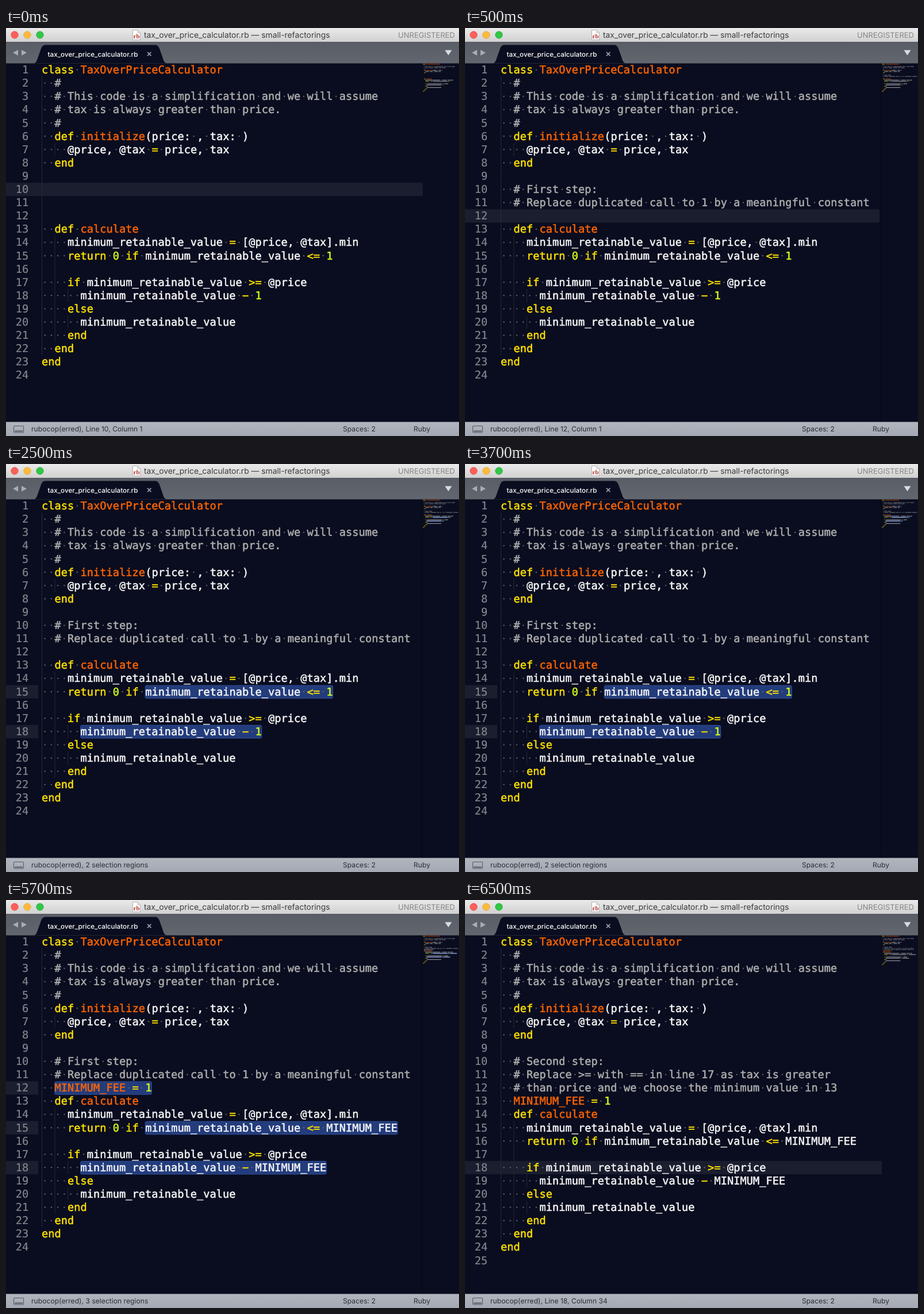
An HTML page for the animation above (8000 ms loop, 788 by 710 pixels).

```html
<!DOCTYPE html>
<html lang="en">
<head>
<meta charset="utf-8">
<title>Refactoring in an editor</title>
<style>
  html, body { margin: 0; width: 100%; height: 100%; overflow: hidden; background: #0a0d1f; }
  svg { display: block; width: 788px; height: 710px; }
  text { white-space: pre; text-rendering: geometricPrecision; }
  .code { font: 18.7px "DejaVu Sans Mono", monospace; }
  .ui { font-family: Inter, "Open Sans", sans-serif; }
</style>
</head>
<body>
<svg id="stage" viewBox="0 0 788 710" xmlns="http://www.w3.org/2000/svg">
  <defs>
    <linearGradient id="title" x2="0" y2="1"><stop stop-color="#ebeaeb"/><stop offset="1" stop-color="#d2d1d2"/></linearGradient>
    <linearGradient id="tabs" x2="0" y2="1"><stop stop-color="#595d66"/><stop offset="1" stop-color="#62666f"/></linearGradient>
    <linearGradient id="status" x2="0" y2="1"><stop stop-color="#b0b5be"/><stop offset="1" stop-color="#a4a9b3"/></linearGradient>
    <linearGradient id="shade"><stop stop-color="#000" stop-opacity="0"/><stop offset="1" stop-color="#000" stop-opacity=".25"/></linearGradient>
  </defs>
  <rect width="788" height="710" fill="#0a0d1f"/>
  <g id="views"></g>

  <g class="ui">
    <rect width="788" height="24" fill="url(#title)"/>
    <g stroke-width=".8">
      <circle cx="15" cy="12" r="6.2" fill="#fc605b" stroke="#e14942"/>
      <circle cx="37" cy="12" r="6.2" fill="#fdbb3e" stroke="#e0a12c"/>
      <circle cx="59" cy="12" r="6.2" fill="#32c647" stroke="#25ad36"/>
    </g>
    <path d="M220.5 3.5h8.5l4.5 4.5v12.5h-13z" fill="#fff" stroke="#a3a3a3" stroke-width=".8"/>
    <path d="M229 3.5v4.5h4.5" fill="#e8e8e8" stroke="#a3a3a3" stroke-width=".8"/>
    <text x="227" y="17.5" text-anchor="middle" font-family="Liberation Serif, serif" font-weight="700" font-size="11" fill="#b3392f">rb</text>
    <text x="240" y="17.3" font-size="13.85" fill="#3c3c3c">tax_over_price_calculator.rb — small-refactorings</text>
    <text x="781" y="17.3" text-anchor="end" font-size="13" fill="#858585">UNREGISTERED</text>

    <rect y="24" width="788" height="37.5" fill="url(#tabs)"/>
    <path d="M49 61.5C53 60 54 56 56 50L61 36C63 31 65 29.5 69 29.5H259C263 29.5 265 31 267 36L272 50C274 56 275 60 279 61.5Z" fill="#0a0d1f"/>
    <path d="M21 38v10l-9-5zM27 38v10l9-5z" fill="#a9adb4"/>
    <path d="M763.5 38.5h12l-6 9z" fill="#d9dbde"/>
    <text x="72.5" y="49.5" font-size="11.7" font-weight="500" fill="#fff">tax_over_price_calculator.rb</text>
    <path d="M246 42l6.5 6.5m0-6.5l-6.5 6.5" stroke="#a8abb3" stroke-width="1.7"/>

    <rect y="685.5" width="788" height="24.5" fill="url(#status)"/>
    <rect x="13.5" y="692.5" width="17" height="11.5" rx="1.5" fill="none" stroke="#575c65" stroke-width="1.1"/>
    <path d="M15 701.5h14" stroke="#575c65" stroke-width="2"/>
    <g font-size="12.15" fill="#2c2f35">
      <text id="note" x="44" y="702.3"></text>
      <text x="586" y="702.3">Spaces: 2</text>
      <text x="709" y="702.3">Ruby</text>
    </g>
  </g>
</svg>
<script>
const LEFT = 62, TOP = 61.4, CHAR = 11.258, LINE = 23.1, BASE = 17.75;
const MAP = { x: 725, y: 62.3, char: 1.08, line: 2.14 };
const INK = { key: '#fee100', name: '#ff6400', num: '#d4fb1e', note: '#aeaeae', text: '#f8f8f8' };
const DURATION = 8000;

const head = `class TaxOverPriceCalculator
  #
  # This code is a simplification and we will assume
  # tax is always greater than price.
  #
  def initialize(price: , tax: )
    @price, @tax = price, tax
  end

`;
const body = fee => `
  def calculate
    minimum_retainable_value = [@price, @tax].min
    return 0 if minimum_retainable_value <= ${fee}

    if minimum_retainable_value >= @price
      minimum_retainable_value − ${fee}
    else
      minimum_retainable_value
    end
  end
end
`;
const first = `  # First step:
  # Replace duplicated call to 1 by a meaningful constant
`;
const second = `  # Second step:
  # Replace >= with == in line 17 as tax is greater
  # than price and we choose the minimum value in 13
`;
const assign = '  MINIMUM_FEE = 1';

// sel: [line, first column]; a selection runs to the end of its line
const steps = [
  { at: 0, code: head + '\n\n' + body(1), row: 10, note: 'Line 10, Column 1' },
  { at: 500, code: head + first + body(1), row: 12, note: 'Line 12, Column 1' },
  { at: 2500, code: head + first + body(1), sel: [[15, 16], [18, 6]], note: '2 selection regions' },
  { at: 4500, code: head + first + assign + body('MINIMUM_FEE'), sel: [[12, 2], [15, 16], [18, 6]], note: '3 selection regions' },
  { at: 6500, code: head + second + assign + body('MINIMUM_FEE'), row: 18, note: 'Line 18, Column 34' }
];

function add(parent, tag, attrs, text) {
  const el = document.createElementNS('http://www.w3.org/2000/svg', tag);
  for (const k in attrs) el.setAttribute(k, attrs[k]);
  if (text) el.textContent = text;
  return parent.appendChild(el);
}
const box = (g, x, y, width, height, fill, more) =>
  add(g, 'rect', { x, y, width, height, fill, ...more });

function tokens(line) {
  if (/^\s*#/.test(line))
    return [...line.matchAll(/\S+/g)].map(m => ({ col: m.index, str: m[0], ink: INK.note }));
  let last = '';
  return [...line.matchAll(/[<>=−]+|@?\w+|[^\s\w]/g)].map(m => {
    const str = m[0];
    let ink = INK.text;
    if (/^(class|def|end|if|else|return|[<>=−]+)$/.test(str)) ink = INK.key;
    else if (/^\d+$/.test(str)) ink = INK.num;
    else if (/^(class|def)$/.test(last) || (m.index === 2 && str === 'MINIMUM_FEE')) ink = INK.name;
    last = str;
    return { col: m.index, str, ink };
  });
}

// Blank lines take the indent of the next line with text
function indentAt(lines, i) {
  const next = lines.slice(i).find(s => s.trim());
  return next ? next.search(/\S/) : 0;
}

function draw({ code, row, sel = [] }) {
  const g = add(document.getElementById('views'), 'g', { class: 'code', visibility: 'hidden' });
  const lines = code.split('\n');
  const top = n => TOP + (n - 1) * LINE;
  const wide = lines.some(s => s.length > 56);
  const right = wide ? 721 : 725;

  if (row) box(g, 0, top(row), right, LINE, '#1b1e2f');
  for (const [n, col] of sel) {
    const span = lines[n - 1].length - col;
    box(g, 0, top(n), 56, LINE, '#1b1e2f');
    box(g, LEFT + col * CHAR, top(n) + .5, span * CHAR, LINE - .5, '#233c7c', { rx: 2.5, stroke: '#2b4a94' });
    box(g, MAP.x + col * MAP.char, MAP.y + (n - 1) * MAP.line - .3, span * MAP.char, 2, '#233c7c');
  }
  if (wide) box(g, 719, 61.5, 6, 624, 'url(#shade)');

  lines.forEach((line, i) => {
    const y = top(i + 1);
    add(g, 'text', { x: 39.3, y: y + BASE, 'text-anchor': 'end', fill: '#84878e', stroke: '#84878e', 'stroke-width': .2 }, String(i + 1));
    for (let c = 0; c < indentAt(lines, i); c += 2)
      box(g, LEFT + c * CHAR, y, 1, LINE, '#252836');
    for (const m of line.matchAll(/ /g))
      add(g, 'circle', { cx: LEFT + (m.index + .5) * CHAR, cy: y + 11.4, r: 1.2, fill: '#5c606e' });
    for (const { col, str, ink } of tokens(line)) {
      add(g, 'text', { x: LEFT + col * CHAR, y: y + BASE, fill: ink, stroke: ink, 'stroke-width': .5 }, str);
      box(g, MAP.x + col * MAP.char, MAP.y + i * MAP.line, str.length * MAP.char - .2, 1.2, ink, { opacity: .55 });
    }
  });
  return g;
}

const views = steps.map(draw);
const note = document.getElementById('note');
let shown = -1;

function tick() {
  const t = performance.now() % DURATION;
  const now = steps.filter(s => s.at <= t).length - 1;
  if (now !== shown) {
    views.forEach((v, i) => v.setAttribute('visibility', i === now ? 'visible' : 'hidden'));
    note.textContent = 'rubocop(erred), ' + steps[now].note;
    shown = now;
  }
  requestAnimationFrame(tick);
}
tick();
</script>
</body>
</html>
```
